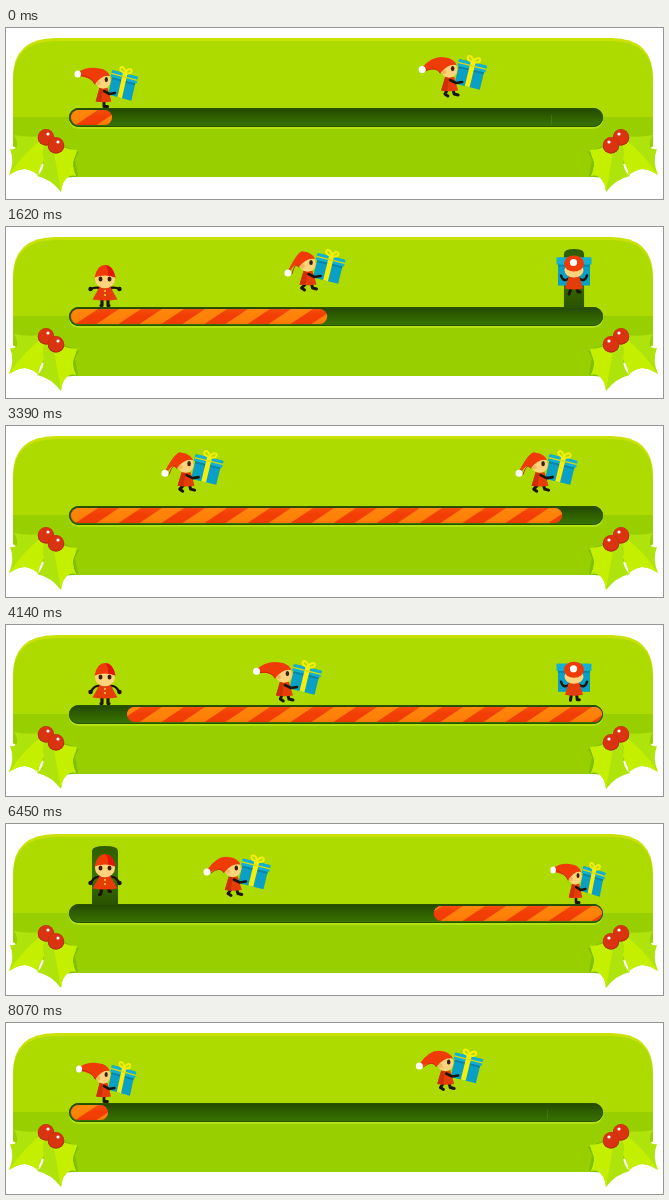
These frames come from a looping animation (657 by 171 pixels, 8100 ms). An HTML page with a canvas:

```html
<!DOCTYPE html>
<html lang="en">
<head>
<meta charset="utf-8">
<title>Holiday loading bar</title>
<style>
  html, body { margin: 0; width: 100%; height: 100%; overflow: hidden; background: #fff; }
  canvas { display: block; width: 657px; height: 171px; }
</style>
</head>
<body>
<canvas id="stage" width="657" height="171"></canvas>
<script>
const ctx = document.getElementById('stage').getContext('2d');
const LOOP = 8100, CYCLE = 2700, HOP = 450;
const SPEED = 354 / CYCLE, FILL_SPEED = 0.1328;
const START_X = 98, LEFT_DOOR = 99, RIGHT_DOOR = 568, GROUND = 80;
const RED = '#ef3b05', DRESS = '#e63c08', SKIN = '#ffd27c', INK = '#1d1408';

const clamp = (v, a = 0, b = 1) => Math.min(b, Math.max(a, v));
const ramp = (t, a, b) => clamp((t - a) / (b - a));
const mix = (a, b, k) => a + (b - a) * k;
const smooth = k => k * k * (3 - 2 * k);
const arc = (t, a, b) => Math.sin(Math.PI * ramp(t, a, b));

// Height of a hop over its progress: soft push-off, hard landing.
const HOP_STEPS = [[0, 0], [.067, 3], [.2, 7.5], [.467, 16], [.6, 16.5], [.733, 14], [.867, 11], [1, 0]];
function hopHeight(u) {
  const i = Math.max(1, HOP_STEPS.findIndex(s => s[0] >= u));
  const [a, y0] = HOP_STEPS[i - 1], [b, y1] = HOP_STEPS[i];
  return mix(y0, y1, (u - a) / (b - a));
}

function paint(path, color) {
  ctx.fillStyle = color;
  ctx.fill(typeof path === 'string' ? new Path2D(path) : path);
}
function dot(x, y, rx, color, ry = rx) {
  ctx.beginPath();
  ctx.ellipse(x, y, rx, ry, 0, 0, 7);
  ctx.fillStyle = color;
  ctx.fill();
}
function stroke(d, color, width) {
  ctx.strokeStyle = color;
  ctx.lineWidth = width;
  ctx.lineCap = ctx.lineJoin = 'round';
  ctx.stroke(typeof d === 'string' ? new Path2D(d) : d);
}
function roundBox(x, y, w, h, r) {
  const p = new Path2D();
  p.roundRect(x, y, w, h, r);
  return p;
}
function gradient(y0, y1, ...colors) {
  const g = ctx.createLinearGradient(0, y0, 0, y1);
  colors.forEach((c, i) => g.addColorStop(i / (colors.length - 1), c));
  return g;
}
function at(x, y, draw, sx = 1, sy = sx) {
  ctx.save();
  ctx.translate(x, y);
  ctx.scale(sx, sy);
  draw();
  ctx.restore();
}

function holly() {
  paint('M52 116 L66 121 L73 124 L69 132 L72 148 L62 150 Z', 'rgba(80,160,0,.35)');
  // Each leaf: whole outline, then the half beyond its middle vein.
  paint('M37 108 Q22 110 8 107 Q12 113 11 119 Q8 122 4 121 Q9 133 3 147 Q12 141 19 141 Q26 142 32 147 Q34 136 42 126 Z', '#aee30c');
  paint('M38 110 Q19 123 3 147 Q12 141 19 141 Q26 142 32 147 Q34 136 42 126 Z', '#c4f000');
  paint('M42 112 Q34 122 38 131 Q38 143 31 148 Q45 151 55 164 Q56 153 62 149 Q66 146 70 148 Q65 137 68 131 Q70 126 71 122 Q58 122 50 115 Z', '#aee30c');
  paint('M46 113 Q50 136 55 164 Q56 153 62 149 Q66 146 70 148 Q65 137 68 131 Q70 126 71 122 Q58 122 50 115 Z', '#c4f000');
  for (const [x, y] of [[40, 109], [50, 117]]) {
    dot(x, y + .5, 8.3, '#a92608');
    dot(x, y, 7.8, '#d9330f');
    dot(x + 2, y - 3, 1.6, '#fff');
  }
}

function backdrop() {
  ctx.fillStyle = '#fff';
  ctx.fillRect(0, 0, 657, 171);
  // The lower corners end behind the leaves.
  const panel = new Path2D('M62 149 L36 135 L7 118 V50 Q7 10 50 10 H605 Q647 10 647 50 V118 L619 135 L593 149 Z');
  paint(panel, '#c9e104');
  ctx.save();
  ctx.clip(panel);
  paint('M7 149 V53 Q7 13 50 13 H605 Q647 13 647 53 V149 Z', '#addb00');
  ctx.fillStyle = '#98cf00';
  ctx.fillRect(7, 89, 640, 60);
  ctx.restore();
}

function track(t) {
  paint(roundBox(63, 82, 534, 19, 9.5), '#b4e312');
  paint(roundBox(63, 80, 534, 19, 9.5), gradient(80, 99, '#234700', '#2f6000', '#397500'));
  stroke(roundBox(63.5, 80.5, 533, 18, 9), '#2a5300', 1);

  const right = 106 + FILL_SPEED * (t > 6000 ? t - LOOP : t);
  const left = t < 7760 ? Math.max(65, 121 + FILL_SPEED * (t - 4140)) : 65;
  const end = t > 3600 && t < 7760 ? 596 : Math.min(596, right);
  if (right > 64 && right < 140) {
    ctx.fillStyle = 'rgba(90,150,0,.45)';
    ctx.fillRect(Math.round(right + 439), 87, 1, 9);
  }
  const w = end - left;
  if (w < 1) return;
  ctx.save();
  ctx.clip(roundBox(left, 82, w, 15, Math.min(7.5, w / 2)));
  ctx.fillStyle = '#f23d05';
  ctx.fillRect(60, 80, 540, 20);
  for (let x = 3; x < 600; x += 43) {
    paint(`M${x} 98 L${x + 24} 82 H${x + 46} L${x + 22} 98 Z`, '#ff8208');
  }
  ctx.fillStyle = gradient(82, 98, 'rgba(255,190,60,.14)', 'rgba(255,120,0,0)', 'rgba(190,20,0,.14)');
  ctx.fillRect(60, 82, 540, 16);
  ctx.restore();
}

function door(x, open) {
  if (open <= 0) return;
  at(x, 0, () => {
    paint('M-13 80 V27 Q-13 22 0 22 Q13 22 13 27 V80 Z', gradient(22, 80, '#2f5c00', '#3a7200', '#2a5200'));
  }, open, 1);
}

function gift(x, y, w, h, tilt = 0, bow = true) {
  ctx.save();
  ctx.translate(x, y);
  ctx.rotate(tilt);
  const l = -w / 2, top = -h / 2;
  ctx.fillStyle = '#0a9fc4';
  ctx.fillRect(l + 1.5, top, w - 3, h);
  ctx.fillStyle = '#0785ab';
  ctx.fillRect(l + 1.5, top + 7, w - 3, 2);
  ctx.fillStyle = '#14b0d2';
  ctx.fillRect(l, top, w, 7);
  if (bow) {
    ctx.fillStyle = '#f4ee0a';
    ctx.fillRect(-2.5, top, 5, h);
    ctx.fillStyle = '#d8dc08';
    ctx.fillRect(l, top + 3, w, 1.3);
    stroke(`M0 ${top} C-9 ${top - 1} -7 ${top - 7} -3 ${top - 5} Q0 ${top - 3} 0 ${top} C9 ${top - 1} 7 ${top - 7} 3 ${top - 5} Q0 ${top - 3} 0 ${top}`, '#f4ee0a', 2);
  }
  ctx.restore();
}

// Side view, feet at the origin; u is the hop progress.
function sideElf(u) {
  const swing = Math.sin(Math.PI * u);
  const px = -28.5 + 8 * swing ** 3, py = -34 + 16 * swing;
  if (u > .04) {
    const k = swing * 3;
    stroke(`M-3 -7 L${-4 - k} -3 L${-1 - k} -1 M3 -7 L4 -3 L8 -2`, INK, 3);
  } else {
    stroke('M0 -7 V-1.5 H4', INK, 3.2);
  }
  paint('M-5 -20 H4 L8 -6.5 Q0 -5 -9 -6.5 Z', DRESS);
  paint('M-5 -20 H-1 L-3 -6 L-9 -6.5 Z', '#cf2f05');
  dot(-1, -27.5, 8.2, SKIN);
  dot(-6, -25, 2.2, '#f4b75c');
  dot(2.5, -28.5, 1.8, '#3a2008', 2.6);
  paint(`M${px} ${py - 2} Q${px + 11} -42 -5 -39.5 Q4 -38.5 6.5 -32 Q-2 -34 -10 -23.5 Q-13 -31 ${px} ${py + 2} Z`, RED);
  stroke(`M-10 -24 Q-13 -31 ${px + 4} ${py + 1}`, '#c92b04', 1);
  dot(px, py, 3.5, '#fff');
  gift(20, -22.5, 29, 25, .24);
  stroke('M0 -17 L6 -14 L12 -15', INK, 2.6);
}

// Front view; hand is the hand height, air lifts the legs apart.
function frontElf(hand, air) {
  const s = 1.5 * air;
  stroke(`M-3 -8 L${-3 - s} -1.5 H${-4 - s} M3 -8 L${3 + s} ${-1.5 - 2 * s} H${4 + s}`, INK, 3.2);
  for (const d of [-1, 1]) {
    stroke(`M${d * 5} -19 Q${d * 11} -20 ${d * 14} ${hand}`, INK, 2.4);
    dot(d * 14.5, hand, 2.2, INK);
  }
  paint('M-5 -21 H5 L12.5 -7.5 Q0 -5.5 -12.5 -7.5 Z', DRESS);
  dot(0, -16, 1, '#ffd23c');
  dot(0, -12, 1, '#ffd23c');
  dot(0, -28, 10, SKIN, 9.3);
  dot(-4.5, -28, 2, '#3a2008', 2.5);
  dot(4.5, -28, 2, '#3a2008', 2.5);
  paint('M-10.5 -29.5 Q-8 -42 0 -42 Q8 -42 10.5 -29.5 Q0 -33.5 -10.5 -29.5 Z', RED);
  paint('M0 -42 Q8 -42 10.5 -29.5 Q7 -31 3 -31.7 Q4 -38 0 -42 Z', '#e3160a');
}

function backElf(air) {
  gift(0, -24, 35, 28, 0, false);
  stroke(`M-2.5 -8 L${-3 - 2 * air} -1.5 M2.5 -8 L${3 + air} ${-1.5 - 2 * air} h2`, INK, 3);
  stroke('M-5 -17 Q-11 -13 -13 -20 M5 -17 Q11 -13 13 -20', INK, 2.5);
  paint('M-5 -20 H5 L9 -7 Q0 -5 -9 -7 Z', DRESS);
  dot(0, -25, 9.5, SKIN, 7);
  dot(0, -32, 10, RED, 8);
  dot(-.5, -33, 3.6, '#fff');
}

function walkers(p) {
  for (const age of [p - 60, p - 60 + CYCLE]) {
    if (age < 0 || age >= 2 * HOP + CYCLE) continue;
    const u = age % HOP / HOP;
    at(START_X + SPEED * age, GROUND - hopHeight(u), () => sideElf(u));
  }
}

function leftSide(p) {
  door(LEFT_DOOR, smooth(ramp(p, 750, 870)) * (1 - smooth(ramp(p, 1170, 1320))));
  if (p < 60 || p >= 2430) {
    const turn = mix(.5, 1, ramp(p < 60 ? p + CYCLE : p, 2430, 2750));
    at(START_X, GROUND, () => sideElf(0), turn, 1);
  } else if (p > 840) {
    const size = mix(.5, 1, smooth(ramp(p, 840, 960)));
    const air = arc(p, 960, 1140);
    const raise = smooth(ramp(p, 1500, 1610));
    const hand = mix(mix(-18, -13, ramp(p, 930, 1050)), -18, raise);
    const dip = 2 * arc(p, 2100, 2220);
    at(LEFT_DOOR, GROUND - 8 * air, () => frontElf(hand + dip, air), size);
    if (p > 1710) {
      const fall = ramp(p, 1710, 2100) ** 2;
      gift(LEFT_DOOR, mix(-20, 60, fall) + dip, 32, 25);
    }
  }
}

function rightSide(p) {
  door(RIGHT_DOOR, smooth(ramp(p, 1530, 1660)) * (1 - smooth(ramp(p, 2280, 2430))));
  if (p >= 960 && p < 1200) {
    const turn = p < 1050 ? mix(1, .8, ramp(p, 960, 1050)) : mix(.8, .3, ramp(p, 1050, 1200));
    at(570, GROUND, () => sideElf(0), turn, 1);
  } else if (p >= 1200 && p < 2400) {
    const air = arc(p, 1400, 1840);
    const size = mix(1, .35, smooth(ramp(p, 2130, 2400)));
    at(RIGHT_DOOR, GROUND - 11.5 * air - 6 * arc(p, 1860, 2100), () => backElf(air), size);
  }
}

function frame(now) {
  const t = now % LOOP, p = t % CYCLE;
  backdrop();
  holly();
  at(655, 0, holly, -1, 1);
  track(t);
  leftSide(p);
  rightSide(p);
  walkers(p);
}

let begin;
function tick(now) {
  begin ??= now;
  frame(Math.max(0, now - begin));
  requestAnimationFrame(tick);
}
frame(0);
requestAnimationFrame(tick);
</script>
</body>
</html>
```
